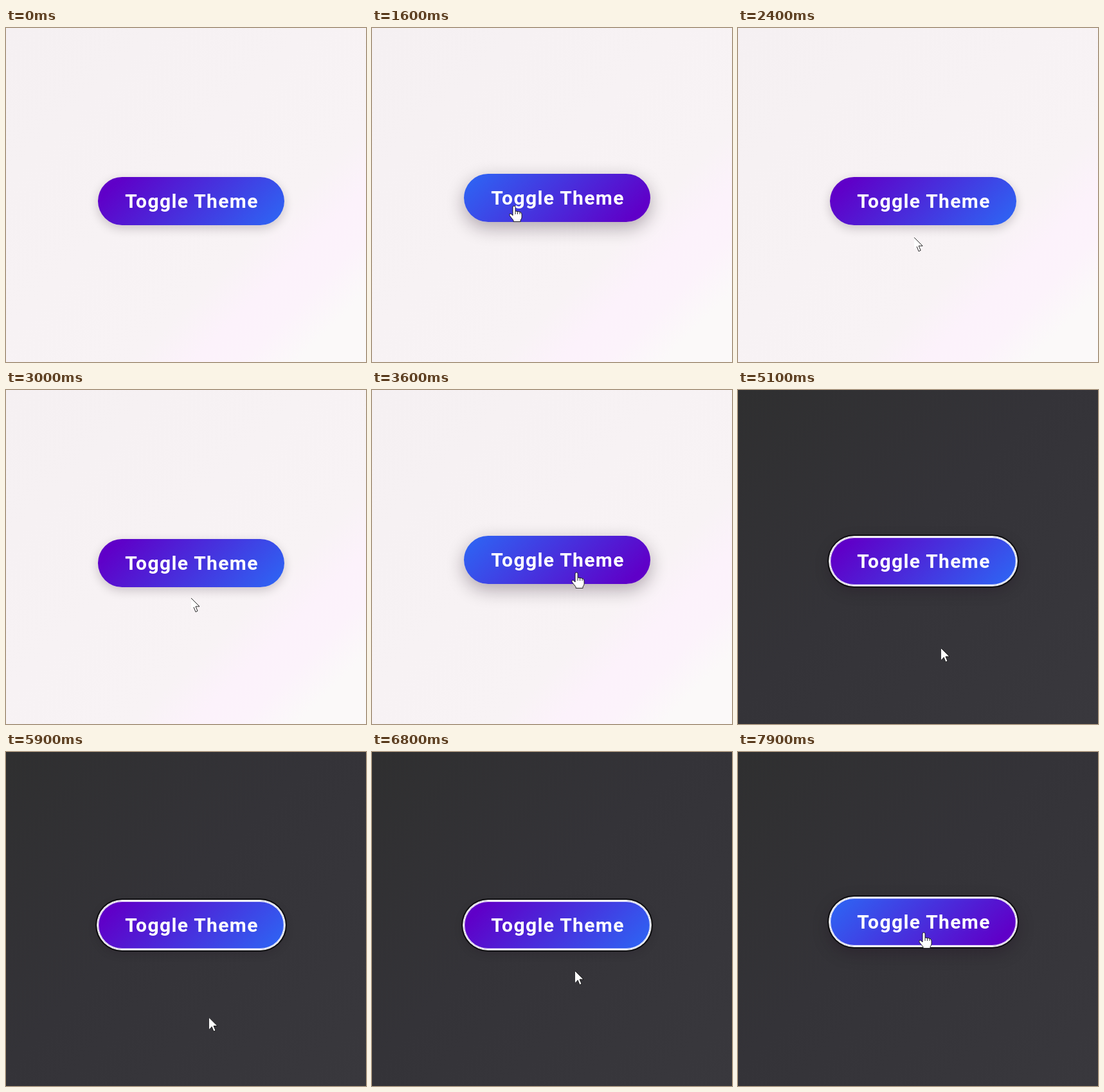
Animation, 560 px wide and 520 px high, one loop 8000 ms. Source, as an HTML page:

```html
<!DOCTYPE html>
<html lang="en">
<head>
<meta charset="utf-8">
<title>Toggle Theme</title>
<style>
html, body { margin: 0; width: 100%; height: 100%; overflow: hidden; }
#stage {
  position: relative; width: 560px; height: 520px; overflow: hidden;
  background: linear-gradient(135deg, #f5f0f2, #f8f3f5 66%, #fcf2fb 75%, #fcf3fb 82%, #fbf9f9 90%);
}
#stage.dark { background: linear-gradient(135deg, #2f2f30, #343338 45%, #39383d); }
#button {
  position: absolute; left: 143px; top: 232px; width: 290px; height: 75px;
  border-radius: 38px; color: #fff; text-align: center; text-indent: 2px;
  font: 700 30px/75px Roboto, sans-serif; letter-spacing: 1.35px;
  background: linear-gradient(135deg, #5f00c8 10%, #2c68f5);
}
#button.hover { background: linear-gradient(135deg, #2c68f5, #5f00c8 90%); }
svg { position: absolute; left: 0; top: 0; overflow: visible; }
path { fill: #fff; stroke: #111; stroke-width: .9; stroke-linejoin: round; }
#arrow path:first-child { stroke: none; }
#arrow path + path { fill: none; }
</style>
</head>
<body>
<div id="stage">
  <div id="button">Toggle Theme</div>
  <svg id="cursor" width="1" height="1">
    <g id="arrow">
      <path d="M0 0V18L4 14L7 21.5L10 20L7 13H13Z"/>
      <path d="M0 0L13 13H7L10 20L7 21.5L4 14"/>
    </g>
    <g id="hand">
      <path d="M-2 1a2 2 0 0 1 4 0V7L8 8Q12 8.5 12 12V17Q12 19 10 21V23.5H-1V21.5L-7 14Q-8 10.5 -5 11L-2 14Z"/>
      <path d="M2 7V12M5.5 7.5V12M9 8.5V12"/>
    </g>
  </svg>
</div>
<script>
const $ = id => document.getElementById(id);
const LOOP = 8000, STEP = 100, RAISE = 300, LIFT = 5;
const FOCUS_AT = 4300, DARK_AT = 4600, BUTTON_BOTTOM = 307;

// Key points of the pointer: time, x, y
const path = [
  [0, 240, 540], [100, 236, 466], [900, 226, 432], [1300, 221, 278], [1600, 221, 278],
  [2700, 286, 337], [3000, 288, 324], [3500, 318, 285], [5025, 322, 284],
  [5100, 316, 402], [5600, 316, 427], [6800, 316, 341], [7700, 289, 282]
];

const mix = (a, b, p) => a + (b - a) * p;

// Standard "ease" curve: cubic-bezier(.25, .1, .25, 1)
function ease(p) {
  const curve = (u, a, b) => 3 * a * u * (1 - u) ** 2 + 3 * b * u * u * (1 - u) + u ** 3;
  let lo = 0, hi = 1;
  for (let i = 0; i < 20; i++) {
    const mid = (lo + hi) / 2;
    if (curve(mid, .25, .25) < p) lo = mid; else hi = mid;
  }
  return curve(lo, .1, 1);
}

function pointer(t) {
  const i = path.findIndex(key => key[0] > t);
  if (i < 1) return path.at(i).slice(1);
  const [t0, x0, y0] = path[i - 1], [t1, x1, y1] = path[i];
  const p = (t - t0) / (t1 - t0), s = p * p * (3 - 2 * p);
  return [mix(x0, x1, s), mix(y0, y1, s)];
}

const hovered = t => pointer(t)[1] < BUTTON_BOTTOM;

// The lift trails the hover state, weighted by the easing curve
function raised(t) {
  const n = 12;
  let sum = 0;
  for (let i = 0; i < n; i++)
    if (hovered(t - i * RAISE / n)) sum += ease((i + 1) / n) - ease(i / n);
  return sum;
}

function draw(now) {
  const t = Math.floor(now % LOOP / STEP) * STEP;
  const up = raised(t), hover = hovered(t), [x, y] = pointer(t);
  const ring = t < FOCUS_AT ? "" :
    "inset 0 0 0 1.2px #fff, 0 0 0 1.8px #fff, 0 0 0 4px #121214, ";

  $("stage").className = t >= DARK_AT ? "dark" : "";
  const button = $("button");
  button.className = hover ? "hover" : "";
  button.style.transform = `translateY(${-LIFT * up}px)`;
  button.style.boxShadow = ring +
    `0 ${mix(5, 9, up)}px ${mix(16, 28, up)}px rgba(25, 0, 25, ${mix(.2, .32, up)})`;

  $("cursor").style.transform = `translate(${x}px, ${y}px)`;
  $("arrow").style.display = hover ? "none" : "";
  $("hand").style.display = hover ? "" : "none";
}

const start = performance.now();
function tick() {
  draw(performance.now() - start);
  requestAnimationFrame(tick);
}
tick();
</script>
</body>
</html>
```
